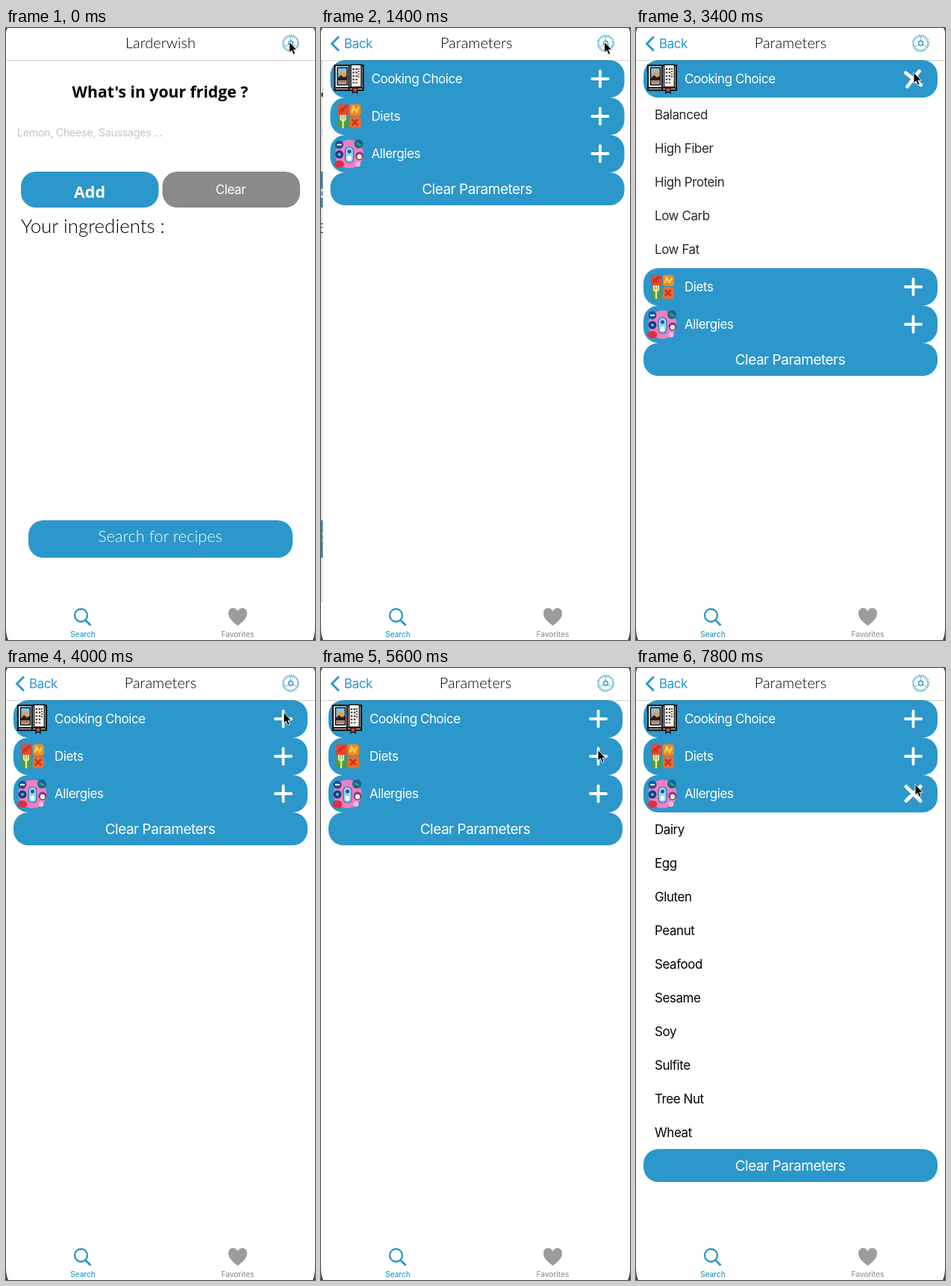
An HTML page that plays this animation: 414x818 px, repeating every 8000 ms.

```html
<!DOCTYPE html>
<html lang="en">
<head>
<meta charset="utf-8">
<style>
  html, body { margin: 0; width: 100%; height: 100%; overflow: hidden; background: #fff; }
  #stage { display: block; width: 414px; height: 818px; }
  text { font: 17px Inter, sans-serif; letter-spacing: -.026em; }
  .script { font-family: Lato, sans-serif; font-weight: 300; letter-spacing: 0; }
  .title { font-size: 20px; }
  .chalk { font-family: "Open Sans", sans-serif; font-weight: 700; letter-spacing: 0; }
  .mid { text-anchor: middle; }
  .blue { fill: #2b97ca; }
  .white { fill: #fff; }
  .line { fill: none; stroke: #2b97ca; }
  .tab { font-size: 10px; font-weight: 500; letter-spacing: 0; }
</style>
</head>
<body>
<svg id="stage" viewBox="0 0 414 818">
  <defs>
    <g id="book">
      <rect x="-19" y="-18" width="38" height="33" fill="#fff" stroke="#111" stroke-width="2.2"/>
      <rect x="-15.5" y="-15" width="13" height="23" fill="#7cc4e8" stroke="#111" stroke-width="1.5"/>
      <circle cx="-9" cy="-5" r="4.5" fill="#f49a3f"/>
      <path d="M-15-1l4-4 4 3 4-2v6h-12z" fill="#222"/>
      <path d="M-15 4h12" stroke="#e06a35" stroke-width="3"/>
      <path d="M0-18V15M-18 12H18" stroke="#111" stroke-width="2.2"/>
      <rect x="2.5" y="-19" width="14" height="30" rx="1" fill="#f7f3ea" stroke="#111" stroke-width="1.6"/>
      <path d="M6-14v20M10-14v20" stroke="#333" stroke-width="2.4" stroke-dasharray="2 2.6"/>
      <path d="M13-14v13" stroke="#333" stroke-width="2" stroke-dasharray="1.5 2"/>
      <path d="M5 12v7l3-2 3 2v-7z" fill="#e0452f" stroke="#111" stroke-width="1.4"/>
    </g>
    <g id="lunch">
      <rect x="-15" y="-16" width="15" height="15" rx="3" fill="#e8492e"/>
      <rect x="1" y="-16" width="15" height="15" rx="3" fill="#ee8a22"/>
      <rect x="-15" y="0" width="15" height="16" rx="3" fill="#4d9a50"/>
      <rect x="1" y="0" width="15" height="16" rx="3" fill="#ee6b2d"/>
      <path d="M-12-5q2-8 4-3q2-8 5-3" fill="none" stroke="#b92f25" stroke-width="2"/>
      <path d="M4-5l2-7 4 6 3-6" fill="none" stroke="#ffd04a" stroke-width="2.6"/>
      <path d="M-11-2v6q3 4 6 0v-6M-8-2v18" fill="none" stroke="#f6e7a0" stroke-width="2.2"/>
      <path d="M4 4l8 8M12 4l-8 8" stroke="#c7361f" stroke-width="2.8"/>
    </g>
    <g id="allergen">
      <circle cx=".5" cy=".5" r="19" fill="#f07fc0"/>
      <circle cx="-13" cy="-12" r="5.5" fill="#1f4f93"/>
      <circle cx="13" cy="-13" r="6" fill="#17658a"/>
      <circle cx="-13" cy="1" r="5.5" fill="#173f80"/>
      <circle cx="14" cy="3" r="5.5" fill="#7b3a8c"/>
      <path d="M-16-12h6" stroke="#fff" stroke-width="2.2"/>
      <path d="M10-14l6 3" stroke="#38a169" stroke-width="3"/>
      <circle cx="-13" cy="1" r="2" fill="#5db7e8"/>
      <circle cx="14" cy="4" r="3.2" fill="#fff3c8"/>
      <rect x="-5" y="-9" width="11" height="21" rx="5" fill="#8ed8f2" stroke="#3466a8" stroke-width="1.2"/>
      <circle cx=".5" cy="-3" r="2.5" fill="#27518f"/>
      <rect x="-2" y="3" width="5" height="6" fill="#fff"/>
      <ellipse cx="-13" cy="14" rx="6.5" ry="5" fill="#e02f3c"/>
      <circle cx="12" cy="14" r="3.5" fill="#f7b7d9"/>
    </g>
  </defs>

  <rect width="414" height="818" fill="#fff"/>

  <g id="home">
    <text class="chalk mid" x="206.5" y="93" style="font-size:21.2px">What's in your fridge ?</text>
    <text x="15" y="145" fill="#c5c5c7" style="font-size:14.4px">Lemon, Cheese, Saussages ...</text>
    <rect class="blue" x="20" y="192" width="184.5" height="48" rx="20"/>
    <text class="chalk mid white" x="112" y="227" style="font-size:21.5px">Add</text>
    <rect x="209.5" y="192" width="184.5" height="48" rx="20" fill="#8a8a8a"/>
    <text class="mid white" x="301" y="222">Clear</text>
    <text class="script" x="20" y="274" style="font-size:25.9px">Your ingredients :</text>
    <rect class="blue" x="30" y="658" width="354" height="50" rx="20"/>
    <text class="script mid white" x="206.5" y="687" style="font-size:21.7px">Search for recipes</text>
  </g>
  <rect id="dim" y="43" width="414" height="725"/>

  <g id="panel">
    <rect y="43" width="414" height="725" fill="#fff"/>
    <g id="sections"></g>
    <g id="reset">
      <rect class="blue" x="10" width="394" height="44" rx="20"/>
      <text class="mid white" x="206.5" y="29" style="font-size:19px">Clear Parameters</text>
    </g>
  </g>

  <rect width="414" height="43" fill="#fff"/>
  <path d="M0 43.5H414" stroke="#000" stroke-opacity=".18"/>
  <text id="homeTitle" class="script title mid" y="27">Larderwish</text>
  <text id="panelTitle" class="script title mid" y="27">Parameters</text>
  <g id="back">
    <path class="line" d="M24 11.5L14.500 21l9.500 9.500" stroke-width="2.8"/>
    <text class="blue" x="31" y="27">Back</text>
  </g>
  <g class="line" transform="translate(381.5 20.5)">
    <circle r="11" stroke-width="1.5" stroke-dasharray="1 1.88"/>
    <circle r="9.7" stroke-width=".9"/>
    <circle r="3" stroke-width="1.4"/>
    <path d="M0-3v-6.500M2.600 1.500l5.600 3.200M-2.600 1.500l-5.600 3.200" stroke-width=".7"/>
  </g>

  <rect y="768" width="414" height="50" fill="#fff"/>
  <circle class="line" cx="100.5" cy="785" r="8.5" stroke-width="2.3"/>
  <path class="line" d="M106.500 791.500l7 7" stroke-width="2.8"/>
  <text class="tab mid blue" x="103" y="814">Search</text>
  <path d="M310.500 799C303 793 298 788.500 298 782.500C298 774 307.500 773 310.500 779.500C313.500 773 323 774 323 782.500C323 788.500 318 793 310.500 799Z" fill="#9c9c9c"/>
  <text class="tab mid" x="310.5" y="814" fill="#949494">Favorites</text>
  <path d="M0 804Q.5 813 3 818H0ZM414 804Q413.500 813 411 818H414ZM0 0H2Q.5 2 0 6ZM414 0H412Q413.500 2 414 6Z" fill="#444"/>
  <path id="cursor" d="M0 0V14.500L3.300 11.500L5.600 17L8.200 15.900L5.900 10.600H10.300Z" stroke="#fff" stroke-width=".9"/>
</svg>

<script>
const LOOP = 8000, STEP = 200, ROW = 50, ITEM = 45, TOP = 43;
const $ = id => document.getElementById(id);
const ease = x => { x = Math.min(1, Math.max(0, x)); return x * x * (3 - 2 * x); };
const ramp = (t, from, to) => ease((t - from) / (to - from));
const move = (el, x, y, more = '') => el.setAttribute('transform', `translate(${x} ${y})${more}`);

const sections = [
  { name: 'Cooking Choice', icon: 'book', open: [3100, 3500], close: 3800,
    items: ['Balanced', 'High Fiber', 'High Protein', 'Low Carb', 'Low Fat', 'Low Sodium'] },
  { name: 'Diets', icon: 'lunch', open: [4700, 5150], close: 5600,
    items: ['Lacto vegetarian', 'Ovo vegetarian', 'Pescetarian', 'Vegan', 'Vegetarian'] },
  { name: 'Allergies', icon: 'allergen', open: [7100, 7700], close: LOOP,
    items: ['Dairy', 'Egg', 'Gluten', 'Peanut', 'Seafood', 'Sesame', 'Soy', 'Sulfite', 'Tree Nut', 'Wheat'] }
];

$('sections').innerHTML = sections.map(s => `<g>
  <rect class="blue" x="10" width="394" height="${ROW}" rx="20"/>
  <use href="#${s.icon}" x="35" y="25"/>
  <text class="white" x="65" y="31">${s.name}</text>
  <path d="M-10.600 0H10.600M0-10.600V10.600" stroke="#fff" stroke-width="3.8" stroke-linecap="round"/>
  <svg y="${ROW}" width="414" height="0">${s.items.map((item, i) =>
    `<text x="25" y="${i * ITEM + 29}">${item}</text>`).join('')}</svg>
</g>`).join('');
sections.forEach((s, i) => {
  s.group = $('sections').children[i];
  s.plus = s.group.querySelector('path');
  s.list = s.group.querySelector('svg');
});

// Each move: start, end, x, y
const cursorMoves = [[1950, 2750, 372, 59.5], [4100, 4750, 371, 109.5], [5900, 6800, 374, 155.5]];

function drawTransition(t) {
  const w = Math.max(0, t - 960) * 0.0164;
  const rest = t > 1500 ? 0 : (1 + w) * Math.exp(-w);   // critically damped spring
  const shown = 1 - rest;
  move($('home'), -124 * shown, 0);
  $('dim').setAttribute('opacity', 0.1 * shown);
  move($('panel'), 414 * rest, 0);
  move($('homeTitle'), 207 - 150 * shown, 0);
  move($('panelTitle'), 207 + 200 * rest, 0);
  $('homeTitle').setAttribute('opacity', Math.max(0, 1 - 1.5 * shown));
  $('panelTitle').setAttribute('opacity', shown);
  $('back').setAttribute('opacity', shown);
}

function drawSections(t) {
  let y = TOP;
  for (const s of sections) {
    const p = t < s.close ? ramp(t, ...s.open) : 0;
    const height = Math.round(p * s.items.length * ITEM);
    move(s.group, 0, y);
    move(s.plus, 371.5, 25, ` rotate(${45 * p}) scale(${1 + 0.28 * p})`);
    s.list.setAttribute('height', height);
    s.list.setAttribute('opacity', p);
    y += ROW + height;
  }
  move($('reset'), 0, y);
}

function drawCursor(t) {
  let x = 379.5, y = 18.5;
  for (const [from, to, toX, toY] of cursorMoves) {
    const p = ramp(t, from, to);
    x += (toX - x) * p;
    y += (toY - y) * p;
  }
  move($('cursor'), x, y);
}

function frame(now) {
  const t = Math.floor(now % LOOP / STEP) * STEP;
  drawTransition(t);
  drawSections(t);
  drawCursor(t);
  requestAnimationFrame(frame);
}
frame(performance.now());
</script>
</body>
</html>
```
